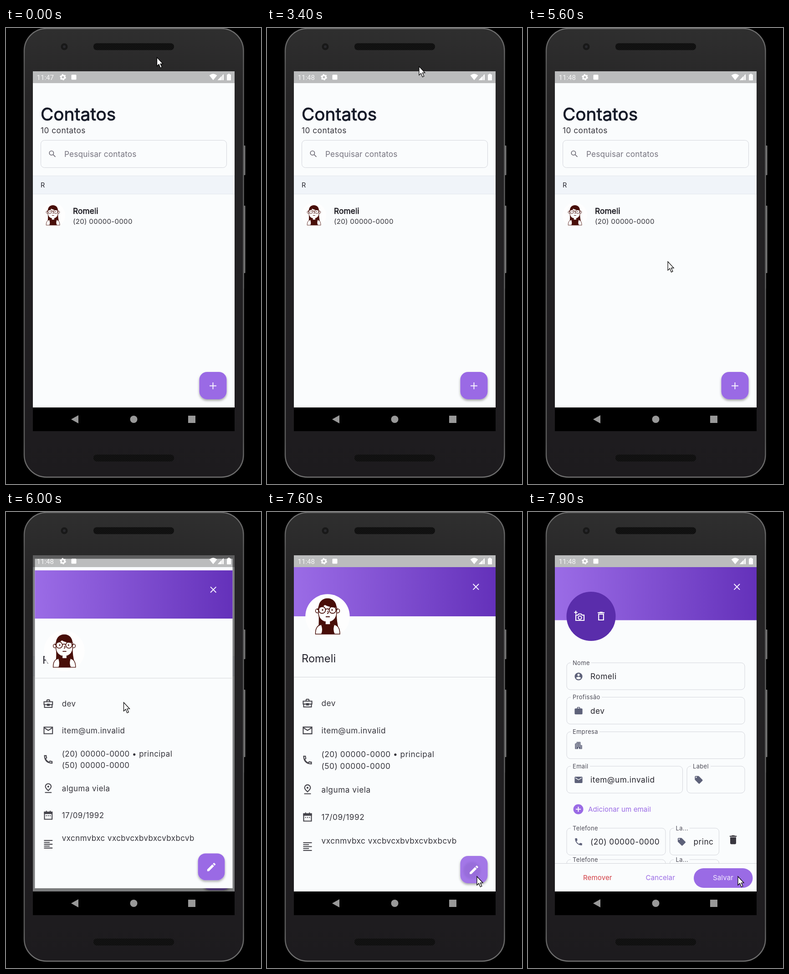
Write an HTML page that moves like this. It is 560 px wide and 1001 px high and loops after 8000 ms.

```html
<!DOCTYPE html>
<html lang="pt">
<head>
<meta charset="utf-8">
<title>Contatos</title>
<style>
html, body { margin: 0; width: 100%; height: 100%; overflow: hidden; background: #000; }
svg { display: block; width: 100vw; height: 100vh; }
text { font-family: Inter, sans-serif; font-optical-sizing: none; white-space: pre; }
.clock { font-family: Roboto, sans-serif; }
</style>
</head>
<body>
<svg id="stage" viewBox="0 0 560 1001"></svg>
<script>
const LOOP = 8000, STEP = 100;
const PURPLE = '#9a6be5', BG = '#fafcfd', INK = '#35343b', SLATE = '#5d6179', HAIR = '#480e08';
const PERSON = 'Romeli', PHONE = '(20) 00000-0000', PHONE2 = '(50) 00000-0000', MAIL = 'item@um.invalid';

// Icons on a 24 unit grid: s is stroked, f is filled.
const LID = 'M19 4h-3.5l-1-1h-5l-1 1H5v2h14z';
const ICONS = {
  search: { s: 'M15 9.5a5.5 5.5 0 1 0-11 0a5.5 5.5 0 1 0 11 0zM13.5 13.5l6.2 6.2' },
  caseLine: { s: 'M3 8h18v6H3zM4 14v6h16v-6M9 8V5l1-1h4l1 1v3M10 13h4v3h-4z' },
  mailLine: { s: 'M3 5h18v14H3zM3.5 6.5L12 12l8.5-5.5' },
  phoneLine: { s: 'M4 4h3.6q.1 2.5.9 4.4L6 11q2.5 4.5 7 7l2.6-2.5q1.9.8 4.4.9V20Q4.5 19.5 4 4z' },
  pin: { s: 'M12 17C8 13.4 6 11 6 8.5a6 6 0 0 1 12 0C18 11 16 13.4 12 17zM5 21h14', f: 'M12 6.5a2 2 0 1 0 0 4a2 2 0 1 0 0-4z' },
  calendar: { s: 'M4 5h16v15H4zM8 2v4M16 2v4M7 12.5h2M11 12.5h2M15 12.5h2', f: 'M3 4h18v5H3z' },
  notes: { s: 'M3 4h18M3 8h12M3 12h18M3 16h12M3 20h18' },
  edit: { f: 'M3 17.25V21h3.75L17.8 9.95l-3.75-3.75zM20.7 7q.6-.7 0-1.4l-2.3-2.3q-.7-.6-1.4 0l-1.85 1.85 3.75 3.75z' },
  account: { f: 'M12 2a10 10 0 1 0 0 20a10 10 0 1 0 0-20zM12 5a3 3 0 1 0 0 6a3 3 0 1 0 0-6zM6 16c0-2 4-3.1 6-3.1s6 1.1 6 3.1c-1.3 2-3.5 3.2-6 3.2s-4.7-1.2-6-3.2z' },
  work: { f: 'M20 6h-4V4q0-2-2-2h-4q-2 0-2 2v2H4q-2 0-2 2v11q0 2 2 2h16q2 0 2-2V8q0-2-2-2zM10 4h4v2h-4z' },
  building: { f: 'M7 3h10v8h4v10h-8v-4h-2v4H3V7h4zM9 5h2v2H9zM13 5h2v2h-2zM5 9h2v2H5zM9 9h2v2H9zM13 9h2v2h-2zM5 13h2v2H5zM9 13h2v2H9zM13 13h2v2h-2zM17 13h2v2h-2zM5 17h2v2H5zM17 17h2v2h-2z' },
  mail: { f: 'M4 4h16q2 0 2 2v12q0 2-2 2H4q-2 0-2-2V6q0-2 2-2zM4 6v2l8 5 8-5V6l-8 5z' },
  tag: { f: 'M21.4 11.6l-9-9Q12 2 11 2H4Q2 2 2 4v7q0 .8.6 1.4l9 9q1.4 1.2 2.8 0l7-7q1.2-1.4 0-2.8zM5.5 7a1.5 1.5 0 1 1 0-3a1.5 1.5 0 1 1 0 3z' },
  phone: { f: 'M6.6 10.8q2.2 4.4 6.6 6.6l2.2-2.2q.5-.5 1-.3 1.7.6 3.6.6 1 0 1 1V20q0 1-1 1A17 17 0 0 1 3 4q0-1 1-1h3.5q1 0 1 1 0 1.9.6 3.6.2.5-.3 1z' },
  trash: { f: 'M6 19q0 2 2 2h8q2 0 2-2V7H6z' + LID },
  trashLine: { s: 'M7 8v12h10V8z', f: LID },
  camera: { s: 'M4 10h4l2-2.5h5l2 2.5h4v11H4zM16 15.3a3.5 3.5 0 1 0-7 0a3.5 3.5 0 1 0 7 0zM4 1v7M.5 4.5h7' }
};

function icon(name, x, y, color, k = 1.06) {
  const { s, f } = ICONS[name];
  return `<g transform="translate(${x} ${y}) scale(${k}) translate(-12 -12)">` +
    (s ? `<path d="${s}" fill="none" stroke="${color}" stroke-width="2"/>` : '') +
    (f ? `<path d="${f}" fill="${color}" fill-rule="evenodd"/>` : '') + '</g>';
}
const text = (x, y, str, size = 17.25, color = INK, gap = 0.5, more = '') =>
  `<text x="${x}" y="${y}" font-size="${size}" fill="${color}" letter-spacing="${gap}" ${more}>${str}</text>`;
const rect = (x, y, w, h, fill, r = 0, more = '') =>
  `<rect x="${x}" y="${y}" width="${w}" height="${h}" rx="${r}" fill="${fill}" ${more}/>`;
const circle = (x, y, r, fill, more = '') => `<circle cx="${x}" cy="${y}" r="${r}" fill="${fill}" ${more}/>`;
const line = (d, color, w = 1) => `<path d="${d}" fill="none" stroke="${color}" stroke-width="${w}"/>`;
const bold = (color, w) => `stroke="${color}" stroke-width="${w}"`;

const fab = inner => rect(424.5, 755, 60, 60, PURPLE, 17, 'filter="url(#drop)"') + inner;
const header = bottom => rect(59, 121, 443, bottom - 121, 'url(#violet)') +
  line('M452.5 158l12.6 12.6m0-12.6l-12.6 12.6', '#f6f0ff', 2);
const page = (id, inner) => `<g id="${id}">${rect(59, 95, 443, 738, BG)}${inner}</g>`;

function field(x, y, w, label, labelW, ico, value = '') {
  const lx = x + 13;
  return rect(x, y, w, 59, 'none', 8, 'stroke="#d4d6dc"') + rect(lx - 4, y - 2, labelW + 8, 5, BG) +
    text(lx, y + 4.5, label, 12.9, '#4c4b56', 0.4) +
    icon(ico, x + 26, y + 30, SLATE, 0.86) + text(x + 52, y + 36, value, 17.25, '#25242c');
}

const face = circle(0, 0, 48.7, '#fefefe') +
  `<path d="M-21 35Q-18 12-20-14C-21-31-12-39.5 0-39.5S21-31 20-14Q19 12 26 33L14 38H-14z" fill="${HAIR}"/>
  <g fill="#fff" stroke="${HAIR}" stroke-width="1.5">
    <circle cx="-22" cy="-12" r="4.5"/><circle cx="22" cy="-12" r="4.5"/>
    <path d="M-20-20Q-11-20-6-26Q4-20 20-20V-8C20 5 11 13 0 13S-20 5-20-8z"/>
    <path d="M-5 11V20H6V11M-26.5 39Q-27 20-13 18H14Q27 20 27 39z"/>
  </g>
  <path d="M-14 39Q-10 30-14 19L-7 17.5Q0 23 8 17.5L15 19Q11 30 16 39z" fill="${HAIR}"/>
  <g fill="none" stroke="${HAIR}" stroke-width="1.8">
    <circle cx="-12" cy="-14" r="7.5"/><circle cx="11" cy="-14" r="7.5"/>
    <path d="M-4.5-15Q-.5-18 3.500-15M-20-15h-3M19-15h3M0-12q4 5-1 6M-4 1H5"/>
  </g>
  <circle cx="-11" cy="-14" r="1.7" fill="${HAIR}"/><circle cx="10" cy="-14" r="1.7" fill="${HAIR}"/>`;

const listPage = page('list',
  text(76, 203, 'Contatos', 38.8, '#151a28', 0, bold('#151a28', 0.9)) +
  text(76, 231, '10 contatos') +
  rect(76.5, 246.5, 408, 60, 'none', 8, 'stroke="#d4d6dc"') +
  icon('search', 102, 276.5, '#6c6a75', 0.84) +
  text(128, 283, 'Pesquisar contatos', 17.25, '#76747f', 0.15) +
  rect(59, 324, 443, 41, '#f0f4f9') + line('M59 324.5H502M59 364.5H502', '#e3e7ec') +
  text(76, 350, 'R', 14.5, '#25242c') +
  `<g transform="translate(103 411) scale(.56)">${face}</g>` +
  text(147, 408, PERSON, 17.25, '#1c1b22', 0.16, bold('#1c1b22', 0.6)) +
  text(147, 430, PHONE, 15.1, INK, 0.27) +
  fab(line('M447 785.5h15m-7.5-7.5v15', '#f8f3ff', 2)));

const rows = [
  ['caseLine', 419.5], ['mailLine', 479.5], ['phoneLine', 544.5], ['pin', 609], ['calendar', 670], ['notes', 734.5]
].map(([name, y]) => icon(name, 89, y, '#45444b')).join('');
const lines = [
  ['dev', 425.5], [MAIL, 486], [PHONE + ' • principal', 538], [PHONE2, 563.5],
  ['alguma viela', 615.5], ['17/09/1992', 676], ['vxcnmvbxc vxcbvcxbvbxcvbxbcvb', 727.5]
].map(([str, y]) => text(119.5, y, str)).join('');

const detailPage = page('detail',
  header(229) + text(76, 330, PERSON, 23.7, '#24232d', 0) +
  line('M59 362.5H502', '#d3d5d9') + rows + lines +
  fab('<g id="ripple">' + rect(424.5, 755, 60, 60, '#fff', 17, 'opacity=".09"') +
    circle(450, 787, 19, '#60419b', 'opacity=".16" filter="url(#soft)"') + '</g>' +
    icon('edit', 454.5, 785.5, '#fff', 1.04)));

const editPage = page('edit',
  header(237.5) + circle(138.5, 229, 54, '#5a2dab') +
  icon('camera', 113.5, 228.5, '#fff') + icon('trashLine', 160.5, 228.5, '#fff') +
  field(85, 331, 391, 'Nome', 37, 'account', PERSON) +
  field(85, 406.5, 391, 'Profissão', 60, 'work', 'dev') +
  field(85, 482.5, 391, 'Empresa', 55, 'building') +
  field(85, 558, 254.5, 'Email', 34, 'mail', MAIL) +
  field(349, 558, 127, 'Label', 35, 'tag') +
  circle(110.5, 652.5, 11, PURPLE) + line('M105 652.5h11m-5.5-5.5v11', '#fff', 2) +
  text(132, 657.5, 'Adicionar um email', 15.1, PURPLE, 0.1) +
  field(85, 694, 217, 'Telefone', 55, 'phone', PHONE) +
  field(311.5, 694, 108, 'La...', 26, 'tag', 'princ') +
  icon('trash', 450.5, 719.5, '#39373f', 1.08) +
  field(85, 763, 217, 'Telefone', 55, 'phone') + field(311.5, 763, 108, 'La...', 26, 'tag') +
  rect(59, 772, 443, 61, BG) + line('M59 771.5H502', '#d3d5d9') +
  text(121, 808, 'Remover', 15.1, '#d23f45', 0.1) + text(258.5, 808, 'Cancelar', 15.1, PURPLE, 0.1) +
  rect(364, 782, 129.5, 43, PURPLE, 21.5) + text(406, 808, 'Salvar', 15.1, '#f4edff', 0.1));

const grille = y => rect(192, y, 177, 15, '#161616', 7) + rect(192, y, 177, 15, 'url(#dots)', 7);
const body = rect(520, 258, 5.5, 65, '#777', 1) + rect(520, 390, 5.5, 148, '#777', 1) +
  rect(520, 538, 3, 34, '#444') +
  rect(40, 1, 481.5, 985, 'url(#shell)', 49, 'stroke="url(#rim)" stroke-width="2.5"') +
  grille(33.5) + grille(936.5) + circle(128, 41, 7.5, '#181818') + circle(128, 41, 3, '#29292c');

const statusBar = rect(59, 95, 443, 26, '#000', 0, 'opacity=".255"') +
  '<text id="clock" class="clock" x="67.5" y="113.5" font-size="15.1" fill="#f6f6f6"></text>' +
  circle(125, 108, 4, 'none', 'stroke="#fff" stroke-width="3"') +
  circle(125, 108, 5.7, 'none', 'stroke="#fff" stroke-width="2.4" stroke-dasharray="3 2.97"') +
  rect(143.5, 102.5, 11, 11, '#fff', 1.5) +
  '<path d="M446.5 104Q455 97 463.5 104L455 114.5zM478 101V114.5H464.5z" fill="#fff"/>' +
  line('M474.5 104V115', '#bbb') +
  rect(485, 102, 9, 13, '#fff', 1) + rect(487.5, 100.5, 4, 2, '#fff');

const navBar = rect(59, 833, 443, 52, '#000') +
  '<path d="M143 859L159 850V868z" fill="#999"/>' + circle(280.5, 859, 8, '#999') + rect(400, 851, 16, 16, '#999');

const scrim = id => rect(59, 95, 443, 738, '#000', 0, `id="${id}"`);

document.getElementById('stage').innerHTML = `<defs>
  <linearGradient id="shell" x2="0" y2="1"><stop stop-color="#2f2f2f"/><stop offset=".15" stop-color="#262526"/><stop offset="1" stop-color="#1d1b1e"/></linearGradient>
  <linearGradient id="rim" x2="0" y2="1"><stop stop-color="#707070"/><stop offset=".08" stop-color="#5b5b5b"/><stop offset=".92" stop-color="#5b5b5b"/><stop offset="1" stop-color="#707070"/></linearGradient>
  <linearGradient id="violet"><stop stop-color="#9b6ce6"/><stop offset="1" stop-color="#6431ba"/></linearGradient>
  <pattern id="dots" width="4" height="4" patternUnits="userSpaceOnUse"><circle cx="1" cy="1" r="1" fill="#080808"/><circle cx="3" cy="3" r="1" fill="#080808"/></pattern>
  <filter id="drop" x="-30%" y="-30%" width="160%" height="160%"><feDropShadow dx="0" dy="3" stdDeviation="2.5" flood-opacity=".34"/></filter>
  <filter id="soft"><feGaussianBlur stdDeviation="2"/></filter>
  <clipPath id="screen"><rect x="59" y="95" width="443" height="738"/></clipPath>
</defs>${rect(0, 0, 560, 1001, '#000')}${body}
<g clip-path="url(#screen)">${listPage}${scrim('dim1')}${detailPage}<g id="hero">${face}</g>${scrim('dim2')}${editPage}${statusBar}</g>
${navBar}
<path id="cursor" d="M0 0V19L4.3 15L7.5 23L10.800 21.5L7.5 14H13z" fill="#fff" stroke="#000" stroke-width="1.2"/>`;

const $ = id => document.getElementById(id);
const el = Object.fromEntries(['list', 'detail', 'edit', 'dim1', 'dim2', 'hero', 'ripple', 'clock', 'cursor'].map(id => [id, $(id)]));

// Cursor stops: time, x, y.
const STOPS = [[0, 331.5, 64.5], [3300, 331.5, 64.5], [4300, 419, 776], [4700, 446, 784],
  [5200, 446, 784], [5800, 258.5, 418], [6700, 258.5, 418], [7600, 461, 800], [LOOP, 461, 800]];
// Page opening: time, incoming scale, outgoing scale, dimming.
const OPEN_DETAIL = [[6000, 0.98, 1.045, 0.5], [6100, 0.997, 1.05, 0.59], [6200, 1, 1, 0]];
const OPEN_EDIT = [[7700, 0.96, 1.03, 0.4], [7800, 0.995, 1.048, 0.57], [7900, 1, 1, 0]];
// Avatar flight: time, x, y, scale.
const FLIGHT = [[6000, 128, 305, 0.92], [6100, 132, 241, 0.98], [6200, 133, 229, 1]];

const latest = (table, t) => table.filter(row => row[0] <= t).pop();
const show = (node, on) => node.setAttribute('visibility', on ? 'visible' : 'hidden');
const zoom = (node, k) =>
  node.setAttribute('transform', `translate(280.5 477) scale(${k}) translate(-280.5 -477)`);

function cursorAt(t) {
  const i = STOPS.findIndex(s => s[0] > t);
  const [t0, x0, y0] = STOPS[i - 1], [t1, x1, y1] = STOPS[i];
  const p = (t - t0) / (t1 - t0), e = p * p * (3 - 2 * p);
  return [x0 + (x1 - x0) * e, y0 + (y1 - y0) * e];
}

function open(table, t, incoming, outgoing, dim) {
  const row = latest(table, t);
  show(incoming, row);
  zoom(incoming, row ? row[1] : 1);
  zoom(outgoing, row ? row[2] : 1);
  dim.setAttribute('opacity', row ? row[3] : 0);
}

function draw(t) {
  open(OPEN_EDIT, t, el.edit, el.detail, el.dim2);
  if (t < OPEN_EDIT[0][0]) open(OPEN_DETAIL, t, el.detail, el.list, el.dim1);
  const fly = latest(FLIGHT, t);
  show(el.hero, fly);
  if (fly) el.hero.setAttribute('transform', `translate(${fly[1]} ${fly[2]}) scale(${fly[3]})`);
  show(el.ripple, t >= 7600 && t < 7900);
  el.clock.textContent = t < 1100 ? '11:47' : '11:48';
  el.cursor.setAttribute('transform', `translate(${cursorAt(t)})`);
}

const start = performance.now();
function tick() {
  const t = (performance.now() - start) % LOOP;
  draw(Math.floor(t / STEP) * STEP);
  requestAnimationFrame(tick);
}
tick();
</script>
</body>
</html>
```
